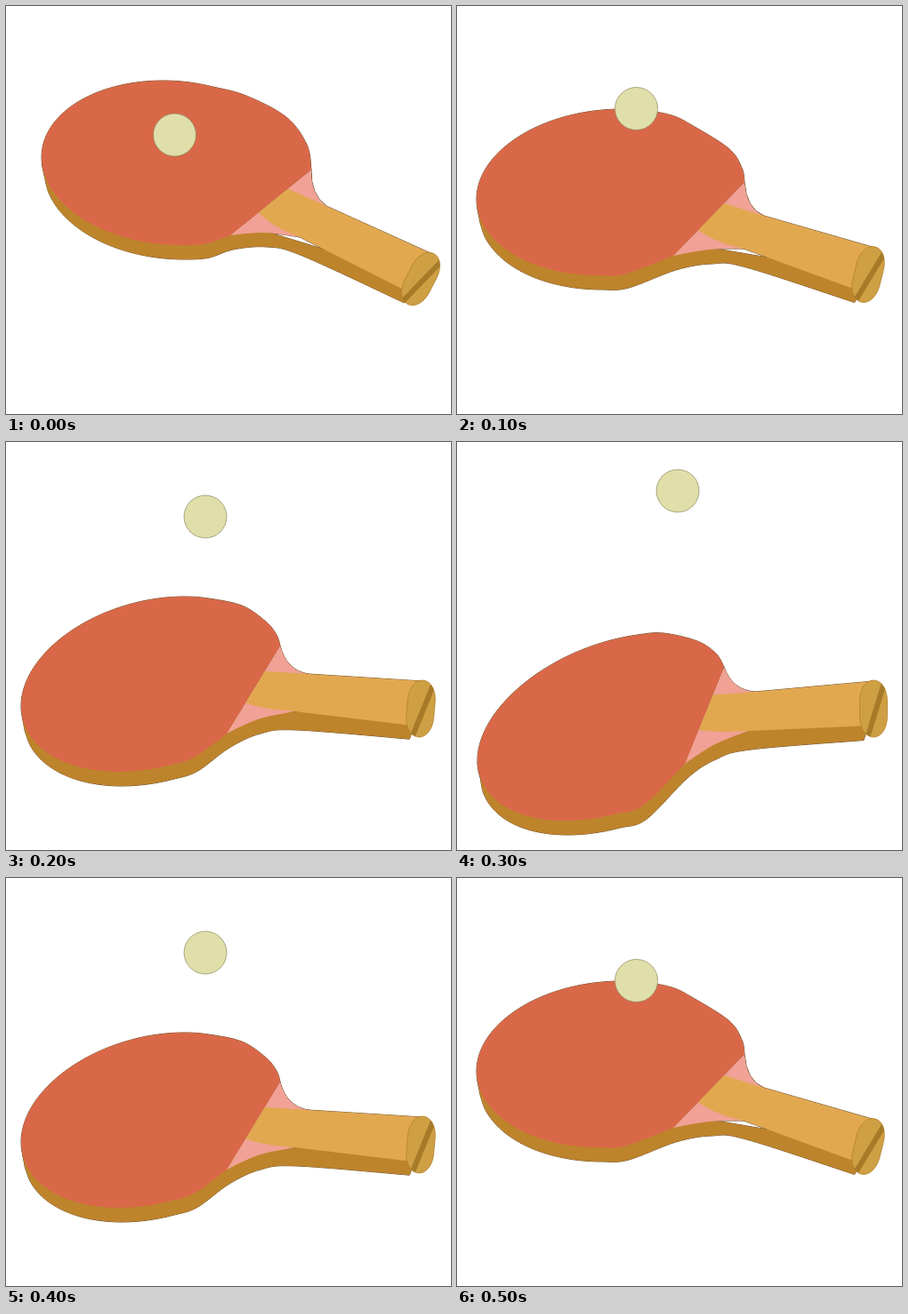
An HTML page that plays this animation: 500x459 px, repeating every 600 ms.

```html
<!DOCTYPE html>
<html lang="en">
<head>
<meta charset="utf-8">
<title>Bouncing ball on a paddle</title>
<style>
  html, body { margin: 0; width: 100%; height: 100%; overflow: hidden; background: #fff; }
  svg { display: block; width: 100%; height: 100%; }
</style>
</head>
<body>
<svg viewBox="0 0 500 459" stroke-linejoin="round">
  <clipPath id="capClip"><rect x="-15.5" y="-32" width="31" height="64" rx="15" ry="23"/></clipPath>
  <path id="outline" fill="none" stroke="#6b4a26"/>
  <path id="body" fill="#be842b"/>
  <path id="throat" fill="#f1a195"/>
  <path id="grip" fill="#e1a850"/>
  <path id="face" fill="#d96848"/>
  <g id="cap">
    <rect x="-15.5" y="-32" width="31" height="64" rx="15" ry="23" fill="#cf9f44" stroke="#b07f2b" stroke-width=".7"/>
    <g clip-path="url(#capClip)">
      <path d="M3 -50V50" transform="rotate(17)" stroke="#a67a28" stroke-width="6"/>
    </g>
  </g>
  <circle id="ball" r="24" fill="#e0dfaa" stroke="#8b885e" stroke-width=".7"/>
</svg>
<script>
// Each pose: blade ellipse [cx, cy, rx, ry, skew], cap [x, y, degrees] and a few joints.
const poses = [
  {
    ball: [189.5, 145], blade: [186.5, 176.5, 146.5, 92.5, 0.07], cap: [466, 307, 27],
    shoulder: [[270, 101], [315, 125], [338, 156]], chord: [[252, 258], [343, 184]],
    elbow: [342, 212], neck: [360, 225], under: [290, 255], tip: [330, 260]
  },
  {
    ball: [201.5, 115.5], blade: [172.5, 209.5, 150.5, 93.5, -0.083], cap: [462, 302, 14],
    shoulder: [[262, 133], [305, 160], [320, 182]], chord: [[243, 281], [323, 198]],
    elbow: [325, 228], neck: [345, 236], under: [283, 274], tip: [322, 273]
  },
  {
    ball: [224, 84], blade: [163.5, 272.5, 146.5, 98.5, -0.249], cap: [466, 300, 5],
    shoulder: [[265, 184], [292, 202], [304, 217]], chord: [[248, 328], [308, 229]],
    elbow: [315, 257], neck: [340, 261], under: [283, 312], tip: [324, 303]
  },
  {
    ball: [248, 55], blade: [176.5, 320.5, 153.5, 105.5, -0.36], cap: [468, 300, 0],
    shoulder: [[270, 224], [291, 238]], chord: [[256, 362], [300, 253]],
    elbow: [309, 279], neck: [335, 281], under: [288, 341], tip: [327, 325]
  }
];
const order = [0, 1, 2, 3, 2, 1];
const STEP = 100;
const DEPTH = [3, 16];

const el = id => document.getElementById(id);
const add = (a, b) => [a[0] + b[0], a[1] + b[1]];
const mix = (a, b, k) => a.map((v, i) => v + (b[i] - v) * k);

// Smooth curve through the points, without the opening move.
function curve(pts) {
  const at = i => pts[Math.max(0, Math.min(pts.length - 1, i))];
  let d = pts[0].join();
  for (let i = 0; i < pts.length - 1; i++) {
    const [a, b, c, e] = [at(i - 1), at(i), at(i + 1), at(i + 2)];
    const out = b.map((v, k) => v + (c[k] - a[k]) / 6);
    const into = c.map((v, k) => v - (e[k] - b[k]) / 6);
    d += `C${out} ${into} ${c}`;
  }
  return d;
}

// Skewed ellipse from the lower right, round the left, to the upper right.
function rim([cx, cy, rx, ry, skew], lowEnd, highEnd) {
  const phase = Math.acos(skew);
  const low = [], high = [];
  for (let i = -5; i <= 18; i++) {
    const t = phase + i * Math.PI / 16;
    const p = [cx + rx * Math.cos(t), cy + ry * Math.cos(t - phase)];
    if (t <= Math.PI) { if (p[0] < lowEnd) low.push(p); }
    else if (p[0] < highEnd) high.push(p);
  }
  return { low, high };
}

function build({ blade, cap, shoulder, chord, elbow, neck, under, tip }) {
  const [bottom, top] = chord;
  const { low, high } = rim(blade, bottom[0] - 25, shoulder[0][0] - 20);
  const a = cap[2] * Math.PI / 180;
  const onCap = (x, y) => add(cap, [x * Math.cos(a) - y * Math.sin(a), x * Math.sin(a) + y * Math.cos(a)]);
  const gripLow = onCap(-14, 19.5);
  const gripHigh = onCap(0, -31);
  const from = mix(bottom, top, 0.35);
  const bow = add(mix(from, tip, 0.5), [-8, 3]);

  const belly = [...low].reverse().concat([bottom, under, add(tip, [0, 5]), gripLow]);
  const left = low[low.length - 1];
  const body = `M${left}L${curve(belly.map(p => add(p, DEPTH)))}L${cap[0]},${cap[1]}Z`;
  const throat = `M${curve([bottom, under, tip])}L${neck}Q${elbow} ${top}Z`;
  const grip = `M${from}Q${bow} ${tip}L${gripLow}L${gripHigh}L${neck}L${mix(bottom, top, 0.71)}Z`;
  const face = `M${curve([bottom, ...low, ...high, ...shoulder, top])}Z`;
  return { body, throat, grip, face, outline: body + throat + grip + face };
}

const shapes = poses.map(build);
let shown = -1;

function draw(time) {
  const index = order[Math.floor(time / STEP) % order.length];
  if (index === shown) return;
  shown = index;
  for (const [id, d] of Object.entries(shapes[index])) el(id).setAttribute("d", d);
  const { ball, cap } = poses[index];
  el("cap").setAttribute("transform", `translate(${cap[0]} ${cap[1]}) rotate(${cap[2]})`);
  el("ball").setAttribute("cx", ball[0]);
  el("ball").setAttribute("cy", ball[1]);
}

const began = performance.now();
function tick() {
  draw(performance.now() - began);
  requestAnimationFrame(tick);
}
tick();
</script>
</body>
</html>
```
